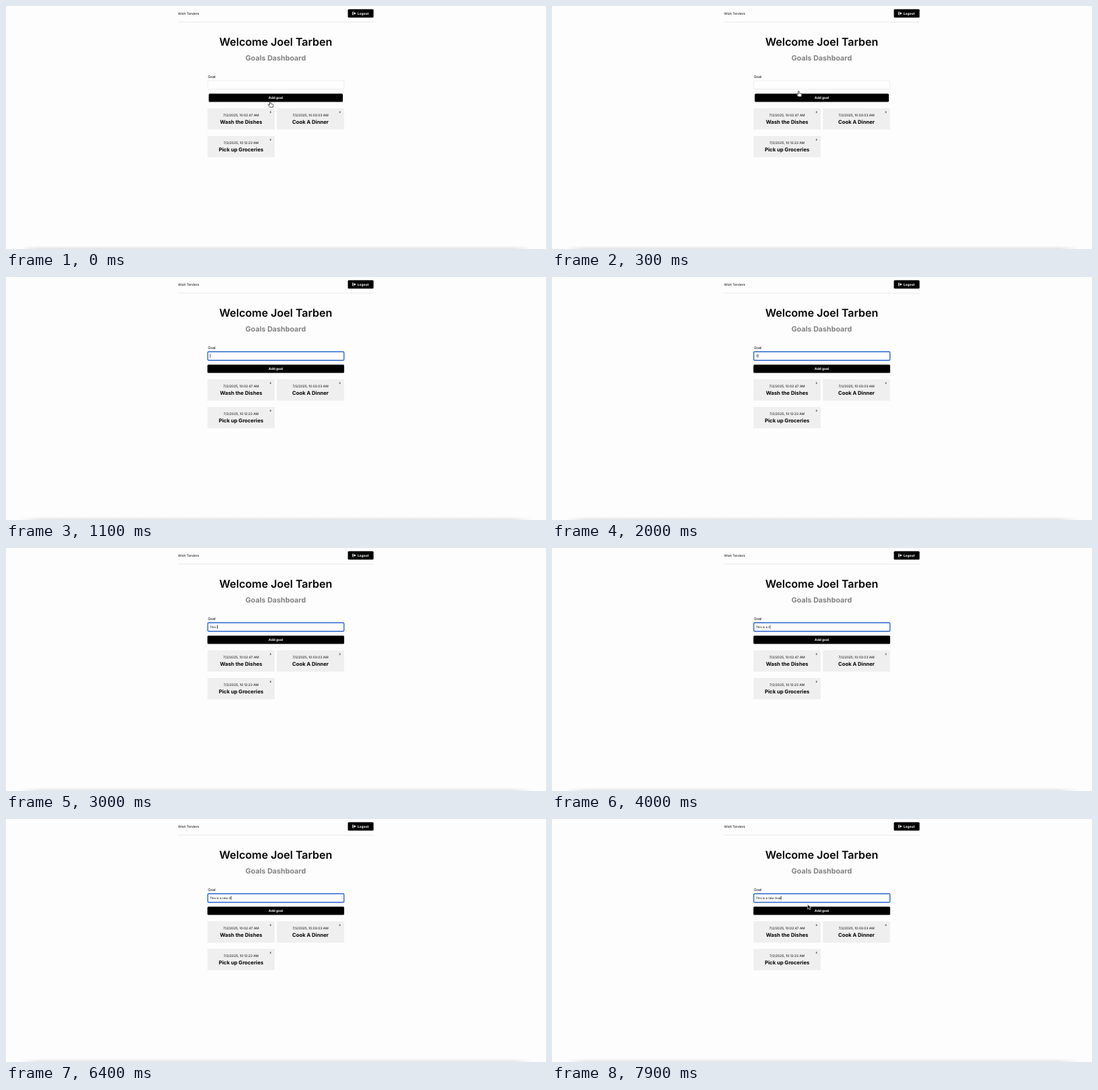
Write an HTML page that moves like this. It is 800 px wide and 361 px high and loops after 8000 ms.

```html
<!DOCTYPE html>
<html lang="en">
<head>
<meta charset="utf-8">
<title>Goals Dashboard</title>
<style>
  html, body { margin: 0; width: 100%; height: 100%; overflow: hidden; background: #fdfdfd; }
  svg { display: block; width: 100vw; height: 100vh; }
  text { font-family: Inter, "Open Sans", sans-serif; text-rendering: geometricPrecision; white-space: pre; }
  .mid { text-anchor: middle; }
  .date { font-size: 4.9px; }
  .goal { font-size: 7.7px; font-weight: 700; }
  .white { fill: #fff; font-weight: 700; font-size: 4.9px; }
</style>
</head>
<body>
<svg viewBox="0 0 800 361">
  <defs>
    <linearGradient id="fade" x2="0" y2="1">
      <stop offset="0" stop-color="#e2e2e2" stop-opacity="0"/>
      <stop offset="1" stop-color="#e2e2e2"/>
    </linearGradient>
    <linearGradient id="ends">
      <stop offset="0" stop-color="#000"/>
      <stop offset=".04" stop-color="#fff"/>
      <stop offset=".96" stop-color="#fff"/>
      <stop offset="1" stop-color="#000"/>
    </linearGradient>
    <mask id="soft"><rect x="20" y="350" width="760" height="11" fill="url(#ends)"/></mask>
  </defs>
  <rect width="800" height="361" fill="#fdfdfd"/>
  <rect x="20" y="356" width="760" height="5" fill="url(#fade)" mask="url(#soft)"/>

  <text x="255" y="12.9" font-size="4.8">Wish Tenders</text>
  <rect x="506.5" y="4.8" width="38" height="12.4" rx="1.5"/>
  <path d="M515 9h-1.4v4h1.4" fill="none" stroke="#fff" stroke-width=".9"/>
  <path d="M514.6 10.3h1.5V8.9l2.2 2.1-2.2 2.1v-1.4h-1.5z" fill="#fff"/>
  <text class="white" x="520.7" y="12.8">Logout</text>
  <path d="M255 24h289.5" stroke="#e4e4e4" stroke-width=".8"/>

  <text class="mid" x="399.7" y="59.4" font-size="16" font-weight="600">Welcome Joel Tarben</text>
  <text class="mid" x="399.5" y="80.8" font-size="10.7" font-weight="700" fill="#828282">Goals Dashboard</text>

  <text x="299.2" y="106.9" font-size="5.3">Goal</text>
  <rect id="field" x="298.9" y="111" width="201.8" height="12.7" rx="1.5" fill="#fefefe"/>
  <text id="typed" x="302" y="118.7" font-size="4.35"></text>
  <rect id="caret" y="114.3" width=".6" height="5.5"/>
  <rect id="button" y="130.2" height="12.4" rx="1.5"/>
  <text class="white mid" x="399.7" y="138">Add goal</text>
  <g id="cards"></g>

  <circle id="ring" cx="348.2" cy="111.8" r="7.5" fill="#fff" fill-opacity=".8" stroke="#111" stroke-width="1.3"/>
  <g id="cursor" stroke-linejoin="round">
    <path id="hand" fill="#fff" stroke="#222" stroke-width=".8"
      d="M-1.5-3.3q0-.8.8-.8t.8.8v2.5l2.5.5q1.4.3 1.3 1.7l-.4 2.9h-4.8l-2.2-3q-.5-.9.3-1.1.6-.1 1.7 1z"/>
    <path id="beam" fill="none" stroke="#222" stroke-width=".8"
      d="M-1.3-3.6q1.3 0 1.3.8v5.6q0 .8-1.3.8M1.3-3.6q-1.3 0-1.3.8M0 2.8q0 .8 1.3.8"/>
    <path id="arrow" stroke="#fff" stroke-width=".6"
      d="M0 0v7.2l1.7-1.5 1.1 2.5 1.3-.6-1.1-2.4h2.3z"/>
  </g>
</svg>
<script>
const $ = id => document.getElementById(id);
const LOOP = 8000, STEP = 100;

const goals = [
  [298.5, 152, "7/2/2025, 10:02:47 AM", "Wash the Dishes"],
  [401.2, 152, "7/2/2025, 10:03:03 AM", "Cook A Dinner"],
  [298.5, 193, "7/2/2025, 10:12:23 AM", "Pick up Groceries"]
];
$("cards").innerHTML = goals.map(([x, y, date, goal]) => `
  <rect x="${x}" y="${y}" width="99.6" height="31.6" fill="#efefef"/>
  <text class="mid date" x="${x + 49.8}" y="${y + 12}">${date}</text>
  <text class="mid goal" x="${x + 49.8}" y="${y + 22.6}">${goal}</text>
  <text class="mid" x="${x + 93.3}" y="${y + 7}" font-size="4.9">x</text>`).join("");

// "<" is a backspace
const keys = [
  [2000, "T"], [2200, "h"], [2300, "i"], [2700, "s"], [2900, " "], [3000, "i"], [3100, "s"], [3200, " "],
  [3400, "a"], [3600, " "], [4000, "n"], [4100, "e"], [4200, "w"], [4400, " "],
  [5100, "g"], [5200, "o"], [5400, "a"], [6000, "<"], [6100, "<"], [6200, "<"],
  [6400, "G"], [6500, "o"], [6700, "a"], [6900, "l"]
];
const caretOff = [[1500, 1900], [4900, 5100], [5900, 6000], [7300, 7700]];
const path = [[0, 392, 146], [500, 352, 122], [600, 352, 122], [800, 348.7, 113], [7600, 348.7, 113], [7900, 378.7, 126.7]];

const within = (t, a, b) => t >= a && t < b;
const show = (id, on) => $(id).setAttribute("visibility", on ? "inherit" : "hidden");
const set = (id, attrs) => { for (const k in attrs) $(id).setAttribute(k, attrs[k]); };

function pointer(t) {
  const i = path.findIndex(p => p[0] > t);
  if (i < 0) return path.at(-1).slice(1);
  const [t0, x0, y0] = path[i - 1], [t1, x1, y1] = path[i];
  const u = (t - t0) / (t1 - t0), e = u * u * (3 - 2 * u);
  return [x0 + (x1 - x0) * e, y0 + (y1 - y0) * e];
}

function draw(t) {
  const focus = t >= 1000;
  set("field", { stroke: focus ? "#2b66cf" : "#e6e6e6", "stroke-width": focus ? 1.4 : .7 });

  const text = keys.filter(k => k[0] <= t)
    .reduce((s, [, c]) => c === "<" ? s.slice(0, -1) : s + c, "");
  $("typed").textContent = text;
  set("caret", { x: 302 + (text ? $("typed").getComputedTextLength() : 0) });
  show("caret", focus && !caretOff.some(([a, b]) => within(t, a, b)));

  const [x, y] = pointer(t);
  const hover = within(y, 130, 151);
  set("button", hover ? { x: 300.4, width: 198.6 } : { x: 298.4, width: 202.6 });
  set("cursor", { transform: `translate(${x} ${y})` });
  show("cursor", !within(t, 1100, 7700));
  const inField = y < 124;
  $("hand").style.display = hover ? "" : "none";
  $("beam").style.display = inField ? "" : "none";
  $("arrow").style.display = hover || inField ? "none" : "";
  show("ring", within(t, 800, 1100));
}

function tick() {
  draw(Math.floor(performance.now() % LOOP / STEP) * STEP);
  requestAnimationFrame(tick);
}
tick();
</script>
</body>
</html>
```
